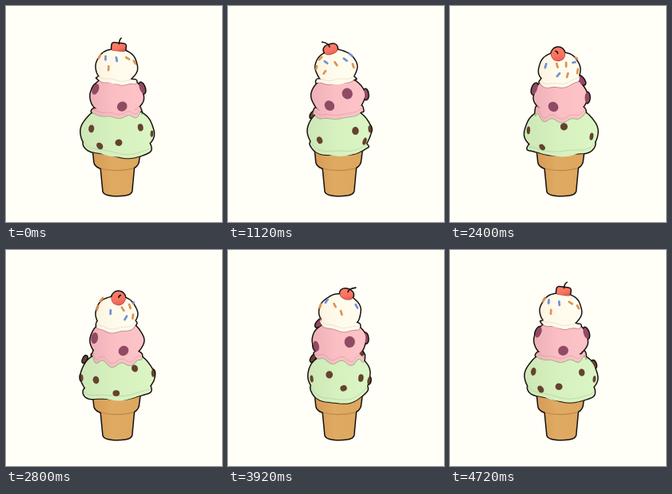
Write an HTML page with a canvas that moves like this. It is 270 px wide and 270 px high and loops after 4800 ms.

```html
<!DOCTYPE html>
<html lang="en">
<head>
<meta charset="utf-8">
<title>Ice cream</title>
<style>
html, body { margin: 0; width: 100%; height: 100%; overflow: hidden; background: #fffff7; }
canvas { display: block; width: 270px; height: 270px; }
</style>
</head>
<body>
<canvas id="stage"></canvas>
<script>
const SIZE = 270, STEP = 80, STEPS = 60;
const INK = '#17110d', CHOC = '#65422f', BERRY = '#914a64';
const ORANGE = '#dd9350', BLUE = '#7191d2';
const canvas = document.getElementById('stage');
const ctx = canvas.getContext('2d');
const ratio = window.devicePixelRatio || 1;
canvas.width = canvas.height = SIZE * ratio;

const { sin, cos, max, PI } = Math;
const rad = d => d * PI / 180;
const PITCH_SIN = 0.42, PITCH_COS = 0.907;

// Toppings: longitude, latitude (degrees), then size or colour and slant
const chips = [
  [-49, 22, 5], [46, 25, 4.6], [75, 3, 4.2], [-28, -3, 4.7], [3, 6, 4.5],
  [-122, 5, 4.6], [-174, 33, 4.6], [114, 13, 4.8], [149, -6, 4.3]
];
const berries = [[-62, 31, 7], [12, 4, 6.5], [-103, 5, 6.6], [165, 3, 6.6], [92, 21, 7.2]];
const sprinkles = [
  [-24, 18, ORANGE, 95], [-47, 43, BLUE, 125], [0, 45, BLUE, 100],
  [46, 42, ORANGE, 130], [70, 22, ORANGE, 105], [-85, 35, ORANGE, 125],
  [-121, 35, BLUE, 165], [-156, 37, ORANGE, 75], [-157, 7, ORANGE, 70],
  [-118, 7, ORANGE, 60], [172, 36, ORANGE, 110], [177, 10, BLUE, 50],
  [131, 28, BLUE, 97]
];

function project(ball, lon, lat, spin) {
  const u = rad(lon) + spin, v = rad(lat);
  const x = cos(v) * sin(u), y = sin(v), z = cos(v) * cos(u);
  return {
    x: ball.x + ball.rx * x,
    y: ball.y - ball.r * (y * PITCH_COS - z * PITCH_SIN),
    facing: y * PITCH_SIN + z * PITCH_COS,
    hidden: -0.1 - 0.4 * y
  };
}

function loop(count, point) {
  const path = new Path2D();
  for (let i = 0; i < count; i++) path.lineTo(...point(i / count * 2 * PI));
  path.closePath();
  return path;
}

function shade(x0, y0, x1, y1, ...stops) {
  const g = ctx.createLinearGradient(x0, y0, x1, y1);
  stops.forEach(([at, color]) => g.addColorStop(at, color));
  return g;
}

// A lumpy dome joined with the dripping skirt around its foot
function scoop(o, spin) {
  const dome = loop(90, t => {
    const k = 1 + 0.012 * sin(5 * t + 2 * spin) + 0.008 * sin(8 * t - 3 * spin);
    return [o.x + o.rx * k * cos(t), o.y + o.ry * k * sin(t)];
  });
  const rim = lift => u => [
    o.x + o.skirtR * sin(u),
    o.skirtY + o.skirtDepth * cos(u) + o.drip(u - spin) - lift
  ];
  const skirt = loop(120, rim(0));
  const shape = new Path2D();
  shape.addPath(dome);
  shape.addPath(skirt);
  const crease = new Path2D();
  for (let u = -1.45; u < 1.46; u += 0.05) crease.lineTo(...rim(4.5)(u));
  return { ...o, parts: [dome, skirt], shape, crease };
}

function blob(p, ball, size) {
  const angle = Math.atan2(p.y - ball.y, p.x - ball.x);
  const path = new Path2D();
  path.ellipse(p.x, p.y, size * max(0.45, Math.abs(p.facing)), size, angle, 0, 2 * PI);
  return path;
}

function lumps(list, ball, color, spin) {
  return list
    .map(([lon, lat, size]) => ({ size, color, ...project(ball, lon, lat, spin) }))
    .filter(p => p.facing > p.hidden)
    .map(p => ({ ...p, path: blob(p, ball, p.size) }));
}

const trunk = new Path2D('M118 194 L121.7 232 Q123 235.5 131 236.5 Q140 237.6 149 236.3 Q156 235 157 231.5 L160.5 194 Z');
const band = new Path2D('M109 180 L110.5 195 Q111 200 118 202.5 Q138 207.5 158 202.5 Q164 200.5 165.5 195 L168 176 Z');

function outline(path, width = 3) {
  ctx.strokeStyle = INK;
  ctx.lineWidth = width;
  ctx.stroke(path);
}

function fill(path, color) {
  ctx.fillStyle = color;
  ctx.fill(path);
}

function strokeInside(shape, path, color, width) {
  ctx.save();
  ctx.clip(shape);
  ctx.strokeStyle = color;
  ctx.lineWidth = width;
  ctx.stroke(path);
  ctx.restore();
}

function drawCone() {
  const paint = shade(109, 0, 168, 0, [0, '#d59c58'], [0.4, '#dfaa62'], [1, '#dda760']);
  fill(trunk, paint);
  strokeInside(trunk, band, '#bd8748', 2.4);
  fill(band, paint);
}

function drawScoop(s) {
  s.lumps.filter(l => l.facing <= 0).forEach(l => fill(l.path, l.color));
  const paint = shade(s.x - s.rx, 0, s.x + s.rx, 0, [0, s.dark], [0.45, s.main], [1, s.light]);
  s.parts.forEach(p => fill(p, paint));
  ctx.strokeStyle = s.line;
  ctx.lineWidth = 1;
  ctx.globalAlpha = 0.35;
  ctx.stroke(s.crease);
  ctx.globalAlpha = 1;
  s.lumps.filter(l => l.facing > 0).forEach(l => fill(l.path, l.color));
}

function drawSprinkles(ball, spin) {
  ctx.lineWidth = 2.7;
  for (const [lon, lat, color, slant] of sprinkles) {
    if (project(ball, lon, lat, spin).facing < 0.08) continue;
    const du = 5.5 * cos(rad(slant)) / cos(rad(lat)), dv = 5.5 * sin(rad(slant));
    const a = project(ball, lon - du, lat - dv, spin);
    const b = project(ball, lon + du, lat + dv, spin);
    ctx.strokeStyle = color;
    ctx.beginPath();
    ctx.moveTo(a.x, a.y);
    ctx.lineTo(b.x, b.y);
    ctx.stroke();
  }
}

function makeCherry(side, back) {
  const x = 138 + 10.5 * side, y = 55.8 - 4.6 * back;
  const rx = 8.5, ry = 6.5 - 2 * back;
  const local = new Path2D();
  local.roundRect(-rx, -ry, 2 * rx, 2 * ry, [{
    x: rx - 6 * max(0, back),
    y: ry - 2.2 * max(0, back)
  }]);
  const body = new Path2D();
  body.addPath(local, new DOMMatrix([1, 0, 0, 1, x, y]).rotate(20 * side));
  const stem = new Path2D();
  stem.moveTo(x + 1.5 * side, y - 2.4 - 1.6 * back);
  stem.quadraticCurveTo(x + 2.5 * side, y - 6.5 - 3 * back, x + 11.5 * side, y - 7.5 - 4 * back);
  return { body, stem, x, y, ry };
}

function draw(spin) {
  const lean = spin + rad(74), side = cos(lean), back = sin(lean);
  const width = 42 + 4 * cos(2 * spin - rad(30));

  const mint = scoop({
    x: 139, y: 157, rx: width, ry: 31, skirtR: width * 0.93, skirtY: 174.3, skirtDepth: 13.7,
    drip: a => 2.4 * cos(a - rad(62)) + 1.6 * cos(2 * (a - rad(60))) + sin(5 * a),
    light: '#dbf5c4', main: '#d6f0be', dark: '#cde7b6', line: '#8fb183'
  }, spin);
  mint.lumps = lumps(chips, { x: 138.5, y: 157, r: 43, rx: width }, CHOC, spin);

  const pink = scoop({
    x: 138.3 + side * 0.8, y: 112.5, rx: 33, ry: 24.5, skirtR: 31.5, skirtY: 132, skirtDepth: 9.2,
    drip: a => 2.4 * cos(a - rad(170)) + (1.8 + 1.6 * cos(a - rad(110))) * cos(8 * (a - rad(94))),
    light: '#fdc4c8', main: '#fabec3', dark: '#efb1b8', line: '#bd7e8a'
  }, spin);
  pink.lumps = lumps(berries, { x: 138, y: 114, r: 33.5, rx: 34.5 }, BERRY, spin);

  const top = { x: 137.5 + 2.5 * side, y: 77.5 - 2 * back, r: 26, rx: 26 };
  const vanilla = scoop({
    x: top.x, y: top.y, rx: 25.5, ry: 21.5, skirtR: 25, skirtY: 92.5, skirtDepth: 7,
    drip: a => 3.3 * cos(a - rad(130)) + 0.9 * sin(6 * a),
    light: '#fffdf0', main: '#fffbec', dark: '#fcf3e1', line: '#cdb497'
  }, spin);
  vanilla.lumps = [];

  const cherry = makeCherry(side, back);

  ctx.setTransform(canvas.width / SIZE, 0, 0, canvas.height / SIZE, 0, 0);
  ctx.lineJoin = ctx.lineCap = 'round';
  ctx.fillStyle = '#fffff7';
  ctx.fillRect(0, 0, SIZE, SIZE);

  // Ink the whole silhouette first, then paint over its inner half
  [trunk, band, cherry.body].forEach(p => outline(p));
  for (const s of [mint, pink, vanilla]) {
    s.parts.forEach(p => outline(p));
    s.lumps.forEach(l => outline(l.path));
  }

  drawCone();
  strokeInside(band, mint.parts[1], INK, 2);
  drawScoop(mint);
  strokeInside(mint.shape, pink.parts[1], mint.line, 1.6);
  drawScoop(pink);
  strokeInside(pink.shape, vanilla.parts[1], pink.line, 1.6);
  drawScoop(vanilla);
  drawSprinkles(top, spin);

  strokeInside(vanilla.shape, cherry.body, '#a8473c', 1.4);
  fill(cherry.body, shade(cherry.x, cherry.y - cherry.ry, cherry.x + 3, cherry.y + cherry.ry,
    [0, '#fb7c67'], [0.6, '#f87361'], [1, '#e65f50']));
  outline(cherry.stem, 1.6);
}

function tick(now) {
  const step = Math.floor(now / STEP) % STEPS;
  draw(step / STEPS * 2 * PI);
  requestAnimationFrame(tick);
}
draw(0);
requestAnimationFrame(tick);
</script>
</body>
</html>
```
